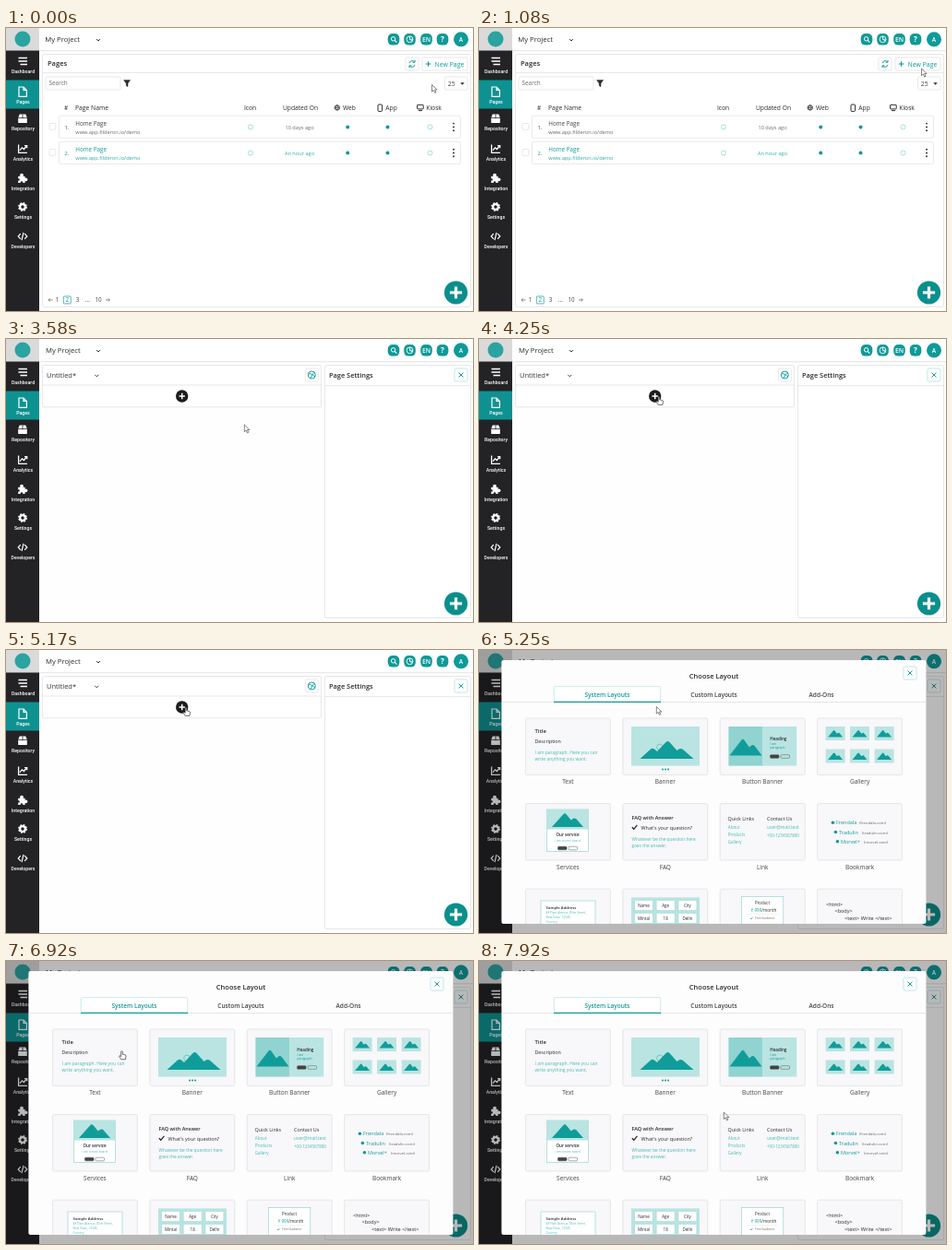
An HTML page that plays this animation: 506x307 px, repeating every 8 s.

```html
<!DOCTYPE html>
<html lang="en">
<head>
<meta charset="utf-8">
<title>Page builder</title>
<style>
  html, body { margin: 0; width: 100%; height: 100%; overflow: hidden; background: #fefefe; }
  svg { display: block; font-family: "Open Sans", "Noto Sans", sans-serif; }
  .side { font: 500 5.2px Roboto, sans-serif; }
</style>
</head>
<body>
<svg id="stage" width="506" height="307" viewBox="0 0 506 307"></svg>
<script>
const TEAL = '#0f9a98', PALE = '#b9e4e2', SOFT = '#45bab7', INK = '#2a2a2a', GREY = '#6a6a6a', LINE = '#dedede';

const text = (x, y, s, size, fill = INK, anchor = 'start', weight = 400) =>
  `<text x="${x}" y="${y}" font-size="${size}" fill="${fill}" text-anchor="${anchor}" font-weight="${weight}">${s}</text>`;
const mid = (x, y, s, size, fill, weight) => text(x, y, s, size, fill, 'middle', weight);
const bold = (x, y, s, size, fill) => text(x, y, s, size, fill, 'start', 600);
const rect = (x, y, w, h, fill = '#fff', stroke = 'none', r = 0, sw = .7) =>
  `<rect x="${x}" y="${y}" width="${w}" height="${h}" rx="${r}" fill="${fill}" stroke="${stroke}" stroke-width="${sw}"/>`;
const circle = (x, y, r, fill, stroke = 'none', sw = .7) =>
  `<circle cx="${x}" cy="${y}" r="${r}" fill="${fill}" stroke="${stroke}" stroke-width="${sw}"/>`;
const path = (d, stroke = INK, sw = 1, fill = 'none') =>
  `<path d="${d}" stroke="${stroke}" stroke-width="${sw}" fill="${fill}"/>`;
const at = (x, y, body) => `<g transform="translate(${x} ${y})">${body}</g>`;
const group = (id, body) => `<g id="${id}">${body}</g>`;

const button = (x, y, w, body = '') => rect(x, y, w, 14, '#fff', LINE, 1.5) + body;
const plus = (x, y, r, color, sw) => path(`M${x - r} ${y}h${2 * r}M${x} ${y - r}v${2 * r}`, color, sw);
const closeBtn = (x, y) => rect(x, y, 14, 14, '#fff', '#a9dcda', 1.5) +
  path(`M${x + 4.6} ${y + 4.6}l4.8 4.8m0-4.8l-4.8 4.8`, TEAL, 1);
const chevron = (x, y) => path(`M${x - 2} ${y - 1}l2 2l2-2`, INK, .9);
const globe = (x, y, r, color) => circle(x, y, r, 'none', color, .9) +
  path(`M${x - r} ${y}h${2 * r}M${x} ${y - r}q${-r * 1.1} ${r} 0 ${2 * r}q${r * 1.1} ${-r} 0 ${-2 * r}`, color, .7);
// A tall peak on the left with a lower one on the right.
const mountains = (x, base, w, h) =>
  path(`M${x} ${base}l${w * .36} ${-h * .92}q${w * .05} ${-h * .14} ${w * .1} 0l${w * .15} ${h * .42}` +
       `l${w * .06} ${-h * .1}q${w * .05} ${-h * .08} ${w * .1} 0L${x + w} ${base}z`, 'none', 0, '#109d9a');
const pills = (x, y) => rect(x, y, 9.5, 3.6, '#444', '#444', 1, .5) + rect(x + 11.5, y, 9.5, 3.6, 'none', '#555', 1, .5);

const sideItems = [
  ['Dashboard', 36, path('M-4.5-3.5h9.5M-4.5 0h9.5M-2.5 3.5h7.5', '#fff', 1.7)],
  ['Pages', 69, path('M-4-5h5l3.4 3.4v6.9h-8.4zM1-5v3.4h3.4', '#fff', 1.2)],
  ['Repository', 98, path('M-4.8-.8l1.5-3.7h6.6l1.5 3.7zM-4.8 0h9.6v5h-9.6z', 'none', 0, '#fff') + path('M0-4.5v4.8', '#222', .8)],
  ['Analytics', 131, path('M-4.4-4.5v8.9h9.4M-3 1.6l2.4-2.8l2 1.7l3.2-3.8M2-3.4h2.7v2.6', '#fff', 1.3)],
  ['Integration', 163, rect(-4.8, -2.2, 7.4, 7.2, '#fff') + circle(-1, -3.3, 1.9, '#fff') + circle(3.6, 1.4, 1.8, '#fff') +
    circle(-1, 4.5, 1.3, '#232325') + circle(-4.4, 1.4, 1.2, '#232325')],
  ['Settings', 194, circle(0, 0, 2.8, 'none', '#fff', 2.2) +
    '<circle r="4.2" fill="none" stroke="#fff" stroke-width="1.5" stroke-dasharray="1.9 1.4"/>'],
  ['Developers', 226, path('M-2.2-2.8l-2.6 2.8l2.6 2.8M2.2-2.8l2.6 2.8l-2.6 2.8M1-4.2l-2 8.4', '#fff', 1.2)],
];

const shell =
  rect(0, 0, 506, 307, '#fefefe') + rect(36, 0, 470, 24.5) + path('M36 24.7h470', LINE, .8) +
  rect(0, 0, 36, 307, '#232325') + rect(0, 0, 36, 24.5, '#dadada') + circle(18, 12, 8.5, '#2ba3a0') +
  rect(0, 56.5, 36, 31, '#0e9291') +
  '<g class="side">' + sideItems.map(([label, y, icon]) => at(18, y, icon) +
    `<text x="18.5" y="${y + 12.8}" text-anchor="middle" fill="#fff">${label}</text>`).join('') + '</g>' +
  chevron(100, 13) +
  [420, 437.5, 455.5, 473].map(x => rect(x - 6.3, 6, 12.6, 12.6, TEAL, 'none', 5)).join('') +
  circle(419.6, 11.8, 2.2, 'none', '#fff', 1) + path('M421.2 13.4l2.2 2.2', '#fff', 1.1) +
  circle(437.5, 12.3, 3.4, 'none', '#fff', .9) + path('M437.5 9v3.3l2.6 1.6M437.5 12.3h3.2', '#fff', .8) +
  mid(455.5, 14.9, 'EN', 6.8, '#fff', 600) + mid(473, 15.2, '?', 8, '#fff', 700) +
  circle(493, 12.3, 8, TEAL) + mid(493, 14.8, 'A', 6.6, '#fff', 600);

const row = (y, n, when, main, sub) =>
  rect(57.4, y, 435, 24, '#fff', LINE, 1.5) + rect(47, y + 8.3, 6.8, 6.8, '#fff', LINE, 1) +
  text(63.5, y + 14.5, n + '.', 5.7, main) + text(75.3, y + 10.7, 'Home Page', 6.3, main) +
  text(75.3, y + 19.5, 'www.app.filderon.io/demo', 5.65, sub) + mid(318, y + 14.3, when, 5.65, sub) +
  [265, 459.5].map(x => circle(x, y + 12.2, 2.5, '#fff', '#7fd0cd')).join('') +
  [370.2, 413.5].map(x => circle(x, y + 12.2, 2, TEAL)).join('') +
  [8.4, 12.2, 16].map(d => circle(485, y + d, .95, INK)).join('');

const list =
  text(42.3, 15.4, 'My Project', 7.7) +
  rect(39.5, 28.5, 464, 274, '#fff', LINE, 2) + path('M39.5 48.5h464', LINE, .7) +
  bold(45, 41.4, 'Pages', 7.5) +
  button(433, 32, 14, path('M437 38.2a3.2 3.2 0 0 1 5.6-1.4M443 39.8a3.2 3.2 0 0 1-5.6 1.4M443 34.8v2.4h-2.4M437 43.2v-2.4h2.4', TEAL, 1)) +
  button(451, 32, 49, plus(457.6, 39, 2.8, TEAL, 1.2) + text(464.6, 41.7, 'New Page', 6.9, TEAL)) +
  button(43, 53, 81, text(46.5, 62.2, 'Search', 6.4, GREY)) +
  path('M127.6 56.6h7l-2.6 3.5v3.6l-1.8-1.2v-2.4z', INK, .5, INK) +
  button(475.5, 53, 24.5, text(478.8, 62.7, '25', 6.8, '#444') + path('M492.3 59.2h4.4l-2.2 2.5z', 'none', 0, INK)) +
  text(63, 89, '#', 6.5) + text(75, 89, 'Page Name', 6.75) + mid(264.5, 89, 'Icon', 6.7) +
  mid(319, 89, 'Updated On', 6.7) + text(365, 89, 'Web', 6.7) + text(411.3, 89, 'App', 6.7) + text(455.3, 89, 'Kiosk', 6.7) +
  globe(358.8, 86.4, 2.7, '#333') + rect(403, 83, 4.6, 7.4, 'none', INK, 1, 1) +
  rect(445.6, 83.3, 6.6, 4.6, 'none', INK, .5, 1) + path('M447 89.6h4', INK, 1) +
  row(95.2, 1, '10 days ago', '#444', GREY) + row(123.3, 2, 'An hour ago', TEAL, '#2aaeab') +
  path('M50.5 295h-4.4m1.7-1.7l-1.7 1.7l1.7 1.7M108 295h4.4m-1.7-1.7l1.7 1.7l-1.7 1.7', '#444', .6) +
  rect(62.3, 291, 8, 8, '#fff', TEAL, 1) +
  [[55.6, '1'], [66.3, '2', TEAL], [77.6, '3'], [88.3, '...'], [100, '10']]
    .map(([x, s, color = '#444']) => mid(x, 297.4, s, 6.3, color)).join('');

const editor =
  text(43, 15.4, 'My Project', 7.7) +
  rect(39.5, 28.5, 302, 45.3, '#fff', LINE, 1.5) + path('M39.5 50h302', LINE, .7) +
  text(44, 42, 'Untitled*', 7.5, '#333') + chevron(98.3, 39.8) +
  button(324.3, 32, 14, circle(331.3, 39, 4, 'none', TEAL, 1) + path('M328 37l4 1.5l2.5-2.5M332 38.5l-2 4M332 38.5l3 2.5', TEAL, .9)) +
  circle(190.7, 62, 6.7, '#1c1c1c') + plus(190.7, 62, 3.2, '#fff', 1.5) +
  rect(345.5, 28.5, 158, 274, '#fff', LINE, 1.5) + path('M345.5 50.5h158', LINE, .7) +
  bold(350, 42.3, 'Page Settings', 7.4) + closeBtn(486, 32);

const fab = circle(487.5, 287, 12.6, '#0b8f8c') + plus(487.5, 287, 6.6, '#fff', 3.2);

const COL = 105.4, ROW = 92.6, CARD_X = 50.4, CARD_Y = 74;
const cards = ['Text', 'Banner', 'Button Banner', 'Gallery', 'Services', 'FAQ', 'Link', 'Bookmark', '', '', '', ''].map((name, i) => {
  const x = CARD_X + i % 4 * COL, y = CARD_Y + Math.floor(i / 4) * ROW;
  return rect(x, y, 92, 61.4, '#f8f7f9', LINE, 1.5) + mid(x + 46, y + 71, name, 6.5, '#444');
}).join('');

const thumbs = [83, 107.5].map(y => [375.6, 402, 428.6].map(x =>
  rect(x, y, 21, 15, PALE) + mountains(x + 2.5, y + 11.5, 16, 7.5)).join('')).join('');
const bookmarks = [['Frendala', 'frendala', 387], ['Tradulin', 'tradulin', 390], ['Morvel+', 'morvel', 392]].map(([name, site, x], i) => {
  const y = 189.2 + i * 10.3;
  return circle(x - 3.6, y - 2, 1.8, TEAL) + text(x, y, name, 5.5, TEAL) + text(x + 25, y, `(${site}.com)`, 4.3, GREY);
}).join('');
const cells = [['Name', 'Age', 'City'], ['Mintal', '18', 'Delhi']].map((line, r) => line.map((s, c) =>
  rect(168.5 + c * 23.7, 271.6 + r * 13.8, 20, 11, '#fff', '#8fd0ce', .5, .5) +
  mid(178.5 + c * 23.7, 278.8 + r * 13.8, s, 4.5)).join('')).join('');

const samples =
  bold(60.5, 89.8, 'Title', 5.9) + text(60.5, 101.4, 'Description', 5.3) +
  text(60.5, 112.8, 'I am paragraph. Here you can', 4.95, SOFT) + text(60.5, 120.2, 'write anything you want.', 4.95, SOFT) +

  rect(165, 83, 74, 42.6, PALE) + circle(196, 105.5, 3.4, 'none', '#5fbfbc', .8) +
  path('M174.5 118l11.5-10.5q2-1.5 4 0l3 2.5l9.5-10q2-2 4 0l8 9l2-1.5q2-1.2 4 0l12 10.5z', 'none', 0, '#109d9a') +
  [199, 202, 205].map(x => circle(x, 129.5, 1, TEAL)).join('') +

  rect(270.4, 83, 37, 42.6, '#90d3d0') + rect(307.2, 83, 37, 42.6, PALE) + mountains(271.5, 114.5, 35, 18) +
  bold(315.3, 97.6, 'Heading', 4.5) + text(315.5, 102.6, 'I am', 3.3, TEAL) + text(315.5, 107.2, 'paragraph', 3.3, TEAL) + pills(315.5, 113.7) +

  thumbs +

  rect(73.5, 173, 45, 45.5, '#fff', '#86cfcc', 0, .6) + rect(73.5, 173, 45, 21.5, PALE) + mountains(79, 192, 34, 15) +
  mid(96, 202.4, 'Our service', 4.6, INK, 600) + mid(96, 208.2, 'i am service board', 3.2, SOFT) + pills(85.5, 213.2) +

  bold(165.5, 183.8, 'FAQ with Answer', 5.5) + path('M165.8 192.3l2 2l3.6-4.4', INK, 1.3) +
  text(175.6, 194.8, "What's your question?", 5.4) +
  text(165.5, 206.6, 'Whatever be the question here', 4.8, SOFT) + text(165.5, 213.6, 'goes the answer.', 4.8, SOFT) +

  text(269.6, 184.6, 'Quick Links', 5.4) + text(312, 184.6, 'Contact Us', 5.4) +
  ['About', 'Products', 'Gallery'].map((s, i) => text(269.8, 194.4 + i * 7.9, s, 4.5, SOFT)).join('') +
  text(312, 194.4, 'user@mail.test', 5, SOFT) + text(312, 203, '+00-1234567890', 4.5, SOFT) +

  bookmarks +

  rect(67, 272, 59, 40, '#fff', '#86cfcc', 0, .6) + bold(72.6, 280.8, 'Sample Address', 4.25) +
  ['48 Plain Avenue, Olive Street,', 'New Town, 12345,', 'Country.'].map((s, i) => text(72.6, 286.4 + i * 4.9, s, 3.2, SOFT)).join('') +

  rect(165, 268.4, 74, 45, PALE) + cells +

  rect(284.3, 267.3, 45.5, 45, '#fff', '#86cfcc', 0, .6) + mid(307, 275.8, 'Product', 4.4) +
  mid(308.5, 283.6, `<tspan fill="${TEAL}">₹ 999</tspan>/month`, 4.6) + path('M290 286.8h34', LINE, .5) +
  path('M294 291l.9 1l1.6-2.2', TEAL, .7) + text(299, 292.2, 'Free Guidance', 3.2, GREY) +

  text(376, 278, '&lt;html&gt;', 5.5) + text(385.5, 285.4, '&lt;body&gt;', 5.5) + text(396, 292.8, '&lt;text&gt; Write &lt;/text&gt;', 5.6);

const modal =
  rect(0, 0, 506, 307, 'rgba(0,0,0,.28)') + rect(24.4, 11, 460, 286, '#fdfdfe', 'none', 2) +
  mid(254.5, 30.8, 'Choose Layout', 7.5, INK, 600) + closeBtn(460, 18) +
  path('M24.4 56.6h460', LINE, .8) + rect(81.3, 39.6, 115.4, 17, '#fff', '#b5e3e1', 1) + path('M81 56.4h116', TEAL, 1.3) +
  mid(139, 50.8, 'System Layouts', 6.5, TEAL, 600) + mid(254.5, 50.8, 'Custom Layouts', 6.5, '#444', 600) +
  mid(371, 50.8, 'Add-Ons', 6.5, '#444', 600) +
  `<clipPath id="body"><rect x="24.4" y="58" width="460" height="239"/></clipPath><g clip-path="url(#body)">${cards}${samples}</g>`;

const arrow = path('M0 0v7.6l1.8-1.6l1.4 2.9l1.3-.6l-1.4-2.8h2.5z', '#444', .65, '#fff');
const hand = path('M-.8.6q.8-1.2 1.6 0v3l3 .7q.8.3.7 1.2l-.6 3.6h-4.6l-2.3-3.3q.2-1.2 1.3-.5l.9.8z', '#333', .7, '#fff');

const $ = id => document.getElementById(id);
$('stage').innerHTML = shell + group('list', list) + group('editor', editor) + fab +
  group('modal', modal) + group('cursor', group('arrow', arrow) + group('hand', hand));

// Time runs in ticks of 1/12 s; stops are [tick, x, y].
const TICKS = 96, EDITOR_AT = 19, MODAL_AT = 63;
const stops = [
  [0, 461.5, 61.5], [5, 479.5, 45.4], [10, 479.5, 45.4], [11, 479.5, 44.7], [12, 479.5, 44.7], [13, 479.5, 44],
  [38, 479.5, 44], [43, 258.3, 93], [48, 195, 62.3], [62, 195, 62.3], [63, 192.3, 61.5],
  [73, 125.5, 97.6], [84, 125.5, 97.6], [95, 265.3, 164],
];

function cursorAt(tick) {
  const next = Math.max(1, stops.findIndex(s => s[0] >= tick));
  const [t0, x0, y0] = stops[next - 1], [t1, x1, y1] = stops[next];
  const p = (tick - t0) / (t1 - t0), e = p * p * (3 - 2 * p);
  return [x0 + (x1 - x0) * e, y0 + (y1 - y0) * e];
}

function overTarget(tick, x, y) {
  if (tick < EDITOR_AT) return false;
  if (tick < MODAL_AT) return Math.hypot(x - 190.7, y - 62) < 7;
  return y > CARD_Y && (x - CARD_X) % COL < 92 && (y - CARD_Y) % ROW < 61.4;
}

const show = (id, on) => $(id).style.display = on ? '' : 'none';

function draw(now) {
  const tick = Math.floor((now + 5) * 12 / 1000) % TICKS;
  const [x, y] = cursorAt(tick), pointing = overTarget(tick, x, y);
  show('list', tick < EDITOR_AT);
  show('editor', tick >= EDITOR_AT);
  show('modal', tick >= MODAL_AT);
  show('arrow', !pointing);
  show('hand', pointing);
  $('cursor').setAttribute('transform', `translate(${x} ${y})`);
}

const start = performance.now();
(function loop() {
  draw(performance.now() - start);
  requestAnimationFrame(loop);
})();
</script>
</body>
</html>
```
